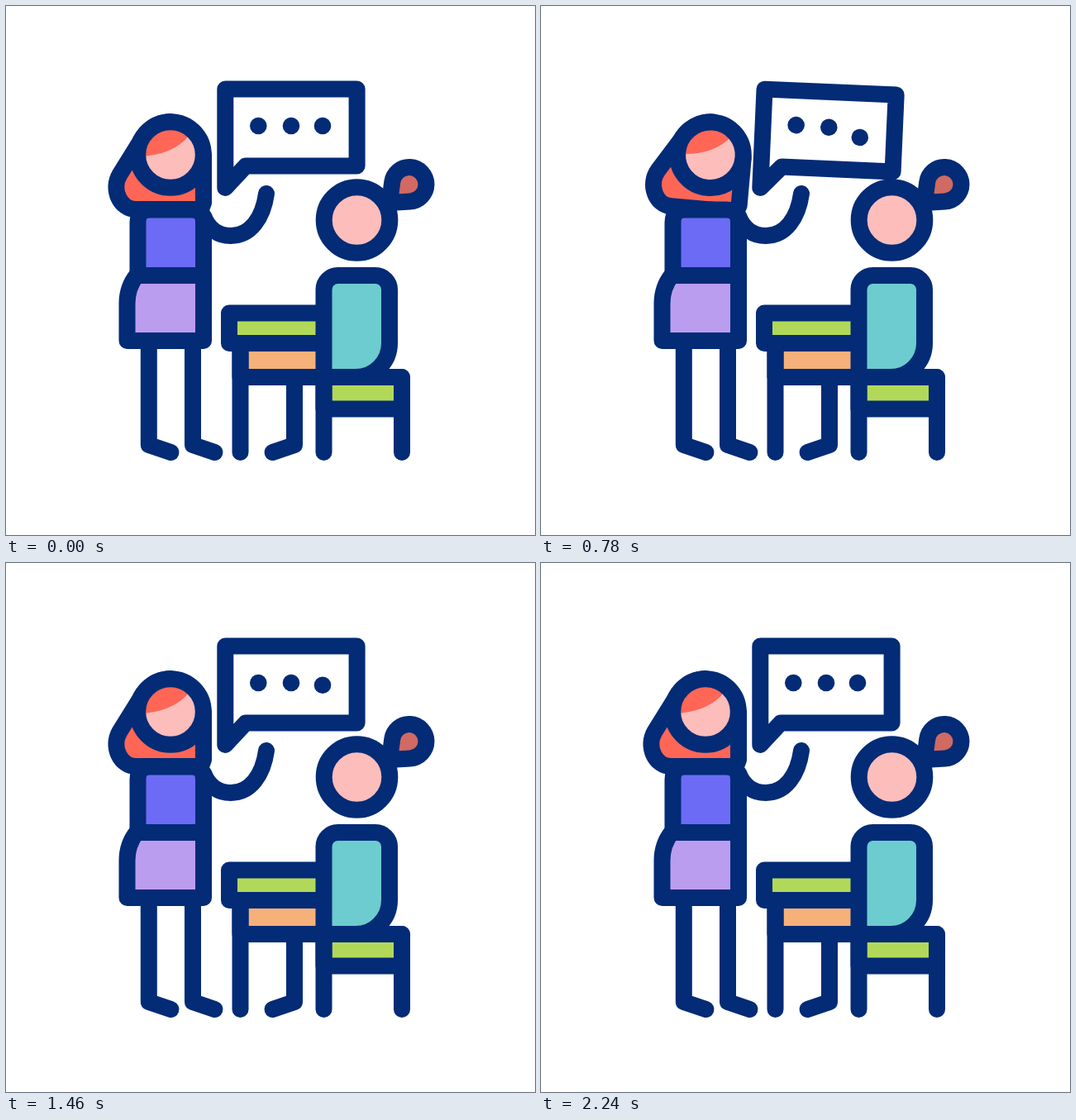
Animation, 640 px wide and 640 px high, one loop 2400 ms. Source, as an HTML page with a canvas:

```html
<!DOCTYPE html>
<html lang="en">
<head>
<meta charset="utf-8">
<title>Lesson</title>
<style>
html, body { margin: 0; width: 100%; height: 100%; overflow: hidden; background: #fff; }
canvas { display: block; width: 100vw; height: 100vh; }
</style>
</head>
<body>
<canvas id="stage"></canvas>
<script>
const SIZE = 640, LOOP = 2400, STEP = 20;
const NAVY = '#032b76', WHITE = '#ffffff', RED = '#ff6656', PINK = '#fcbdbb';
const VIOLET = '#6c6bf5', LILAC = '#bb9df0', GREEN = '#b2d85a';
const ORANGE = '#f6b17a', TEAL = '#6ccccf', BROWN = '#d06a62';

const canvas = document.getElementById('stage');
const ctx = canvas.getContext('2d');

// Each track is a list of [ms, value]; values ease in and out between keys.
const tracks = {
  bubble: [[200, 0], [510, -6.1], [800, 2.6], [1110, -6.1], [1370, 0]],
  head: [[200, 0], [510, 7.9], [800, 5], [1060, 8], [1400, 0]],
  arm: [[200, 0], [500, 11.9], [780, 0], [1100, 12], [1420, 0]],
  pupil: [[1540, 0], [1910, -12.2], [2240, 0]],
  dots: [
    [[200, 0], [430, 8.5], [720, -4], [1010, 8.5], [1240, 0]],
    [[350, 0], [595, 8.5], [850, -4], [1165, 8.5], [1400, 0]],
    [[440, 0], [755, 9], [1030, -4.7], [1330, 8.5], [1540, 0]]
  ]
};

function valueAt(keys, t) {
  if (t <= keys[0][0]) return keys[0][1];
  for (let i = 1; i < keys.length; i++) {
    const [t0, a] = keys[i - 1], [t1, b] = keys[i];
    if (t < t1) {
      const k = (1 - Math.cos(Math.PI * (t - t0) / (t1 - t0))) / 2;
      return a + (b - a) * k;
    }
  }
  return keys[keys.length - 1][1];
}

const path = d => new Path2D(d);

const shapes = {
  bubble: path('M265.3 100.5H424.6V193.5H290L265.3 220Z'),
  hair: path('M199 140Q176 141 163 163L137.5 204C127 222 138 246 157 246H236L239 238V180Z'),
  fringe: path('M160 182Q202 181 222 156V130H160Z'),
  torso: path('M159.5 326V262Q159.5 246.5 174 246.5H224Q239 246.5 239 262V326Z'),
  skirt: path('M158 326H239V405H146.5V360C146.5 346 150 336 158 326Z'),
  arm: path('M239 254C245 270 257 278 272 278C296 278 311 256 315 227'),
  legs: path('M172.8 405V531L199.5 540M226 405V531L252.5 540'),
  desk: path('M385 371.5H270V408H385Z'),
  drawer: path('M283.5 408H385V449H283.5Z'),
  deskLegs: path('M283.5 408V540M349 449V531L322.5 540'),
  seat: path('M384.5 449H479V487.5H384.5Z'),
  chairLegs: path('M384.5 449V540M479 449V540'),
  pupil: path('M384.5 449V343A17 17 0 0 1 401.5 326H447A17 17 0 0 1 464 343V408A41 41 0 0 1 423 449Z'),
  tail: path('M464 238L467.2 213.4A20.7 20.7 0 1 1 488.8 236.4Z')
};

function draw(shape, fill) {
  if (fill) {
    ctx.fillStyle = fill;
    ctx.fill(shape);
  }
  ctx.stroke(shape);
}

function disc(x, y, r) {
  const p = new Path2D();
  p.arc(x, y, r, 0, Math.PI * 2);
  return p;
}

function turned(x, y, deg, paint) {
  ctx.save();
  ctx.translate(x, y);
  ctx.rotate(deg * Math.PI / 180);
  ctx.translate(-x, -y);
  paint();
  ctx.restore();
}

function teacherHead() {
  const face = disc(199, 180, 39.8);
  draw(shapes.hair, RED);
  ctx.fillStyle = PINK;
  ctx.fill(face);
  ctx.save();
  ctx.clip(face);
  ctx.fillStyle = RED;
  ctx.fill(shapes.fringe);
  ctx.restore();
  draw(face);
}

function speech(t) {
  draw(shapes.bubble, WHITE);
  ctx.fillStyle = NAVY;
  [305.3, 345, 383].forEach((x, i) => {
    ctx.fill(disc(x, 145 + valueAt(tracks.dots[i], t), 10.3));
  });
}

function pupilHead() {
  draw(shapes.tail, BROWN);
  draw(disc(424.5, 259, 39.8), PINK);
}

function scene(t) {
  ctx.fillStyle = WHITE;
  ctx.fillRect(0, 0, SIZE, SIZE);
  ctx.strokeStyle = NAVY;
  ctx.lineWidth = 20;
  ctx.lineCap = ctx.lineJoin = 'round';

  turned(265, 220, valueAt(tracks.bubble, t), () => speech(t));
  turned(199, 247, valueAt(tracks.head, t), teacherHead);
  turned(239, 257, valueAt(tracks.arm, t), () => draw(shapes.arm));
  draw(shapes.legs);
  draw(shapes.skirt, LILAC);
  draw(shapes.torso, VIOLET);

  draw(shapes.drawer, ORANGE);
  draw(shapes.desk, GREEN);
  draw(shapes.deskLegs);
  draw(shapes.seat, GREEN);
  draw(shapes.chairLegs);
  draw(shapes.pupil, TEAL);
  turned(428, 300, valueAt(tracks.pupil, t), pupilHead);
}

function resize() {
  const dpr = window.devicePixelRatio || 1;
  canvas.width = Math.round(innerWidth * dpr);
  canvas.height = Math.round(innerHeight * dpr);
}

const start = performance.now();

function frame() {
  const t = Math.max(0, performance.now() - start) % LOOP;
  const { width: w, height: h } = canvas;
  const k = Math.min(w, h) / SIZE;
  ctx.setTransform(k, 0, 0, k, (w - SIZE * k) / 2, (h - SIZE * k) / 2);
  scene(Math.floor(t / STEP) * STEP);
  requestAnimationFrame(frame);
}

addEventListener('resize', resize);
resize();
frame();
</script>
</body>
</html>
```
